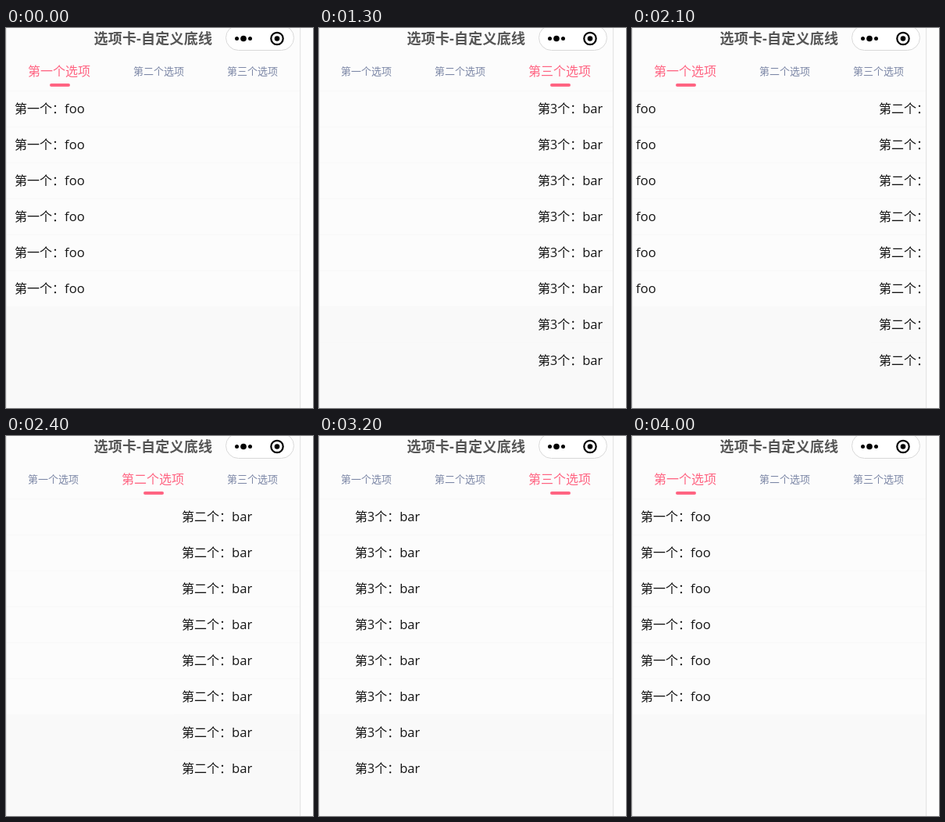
Write an HTML page that moves like this. It is 393 by 486 pixels and loops after 4700 ms.

```html
<!DOCTYPE html>
<html lang="zh-CN">
<head>
<meta charset="utf-8">
<title>选项卡</title>
<style>
  html, body { margin: 0; width: 100%; height: 100%; overflow: hidden; background: #fdfdfd; }
  body { position: relative; font: 16px 'Open Sans', 'Noto Sans CJK SC', 'Noto Sans CJK', sans-serif; color: #141414; }
  .phone { position: absolute; left: 0; top: 0; width: 375px; height: 486px; overflow: hidden;
    background: #f9f9f9; border: solid #e6e6e6; border-width: 0 0 0 1px; box-shadow: 1px 0 1px #e4e4e4; }
  .head { position: absolute; left: 0; top: 0; width: 375px; height: 80px; background: #fcfcfc; }
  .title { position: absolute; left: 111.5px; top: -6px; line-height: 39px; font-size: 18px; font-weight: bold;
    letter-spacing: .2px; color: #555; white-space: nowrap; }
  .capsule { position: absolute; left: 280px; top: -4px; }
  .tabs { position: absolute; left: 27px; top: 35px; display: flex; gap: 55px; line-height: 40px; white-space: nowrap; }
  .tab { font-size: 13px; color: #7c87a6; }
  .tab.on { font-size: 16px; color: #ff6482; }
  .bar { position: absolute; left: 55px; top: 71px; width: 26px; height: 4px; border-radius: 2px; background: #ff6482; }
  .view { position: absolute; left: 0; top: 80px; width: 375px; height: 406px; overflow: hidden;
    background: linear-gradient(#fcfcfc 276px, #f9f9f9 0); }
  .track { display: flex; align-items: flex-start; width: 1125px; }
  .pane { width: 375px; }
  .row { height: 46px; line-height: 46px; padding-left: 10px; box-sizing: border-box; white-space: nowrap;
    box-shadow: inset 0 1px #f8f8f8; }
  .word { font-size: 16.6px; }
</style>
</head>
<body>
<div class="phone">
  <div class="head">
    <div class="title">选项卡-自定义底线</div>
    <svg class="capsule" width="88" height="34">
      <rect x=".5" y=".5" width="87" height="32" rx="16" fill="#fff" stroke="#d8d8d8"/>
      <circle cx="14.5" cy="17.5" r="2.5"/>
      <circle cx="23" cy="17.5" r="3.8"/>
      <circle cx="31.5" cy="17.5" r="2.5"/>
      <circle cx="66" cy="17.5" r="7.7" fill="none" stroke="#000" stroke-width="2.2"/>
      <circle cx="66" cy="17.5" r="3.3"/>
    </svg>
    <div class="tabs"></div>
    <div class="bar"></div>
  </div>
  <div class="view"><div class="track"></div></div>
</div>
<script>
  const LOOP = 4700, TICK = 100, WIDTH = 375;
  const RATE = 0.216; // share of a slide covered per tick
  // [time, from pane, to pane, progress already made at that time]
  const moves = [
    [700, 0, 1, 0.046],
    [1300, 1, 2, 0.153],
    [1800, 2, 0, 0.047],
    [2400, 0, 1, 0.245],
    [2900, 1, 2, 0.047],
    [3600, 2, 0, 0.2]
  ];
  const panes = [['第一个：', 'foo', 6], ['第二个：', 'bar', 8], ['第3个：', 'bar', 8]];

  const $ = sel => document.querySelector(sel);
  const add = (parent, cls, text = '', tag = 'div') => {
    const el = document.createElement(tag);
    el.className = cls;
    el.textContent = text;
    return parent.appendChild(el);
  };

  const track = $('.track'), bar = $('.bar');
  const tabs = ['第一个选项', '第二个选项', '第三个选项'].map(name => add($('.tabs'), 'tab', name));
  for (const [label, word, count] of panes) {
    const pane = add(track, 'pane');
    for (let i = 0; i < count; i++) add(add(pane, 'row', label), 'word', word, 'span');
  }

  function render(ms) {
    const t = Math.floor(ms % LOOP / TICK) * TICK;
    const [start, from, to, phase] = moves.filter(m => m[0] <= t).pop() || [0, 0, 0, 1];
    const left = 1 - Math.min(1, phase + (t - start) / TICK * RATE);
    const pos = to + (from - to) * left * left;
    track.style.transform = `translateX(${-Math.round(pos * WIDTH)}px)`;
    bar.style.transform = `translateX(${to * 120}px)`;
    tabs.forEach((tab, i) => tab.classList.toggle('on', i === to));
  }

  const t0 = performance.now();
  function loop() {
    render(performance.now() - t0);
    requestAnimationFrame(loop);
  }
  loop();
</script>
</body>
</html>
```
